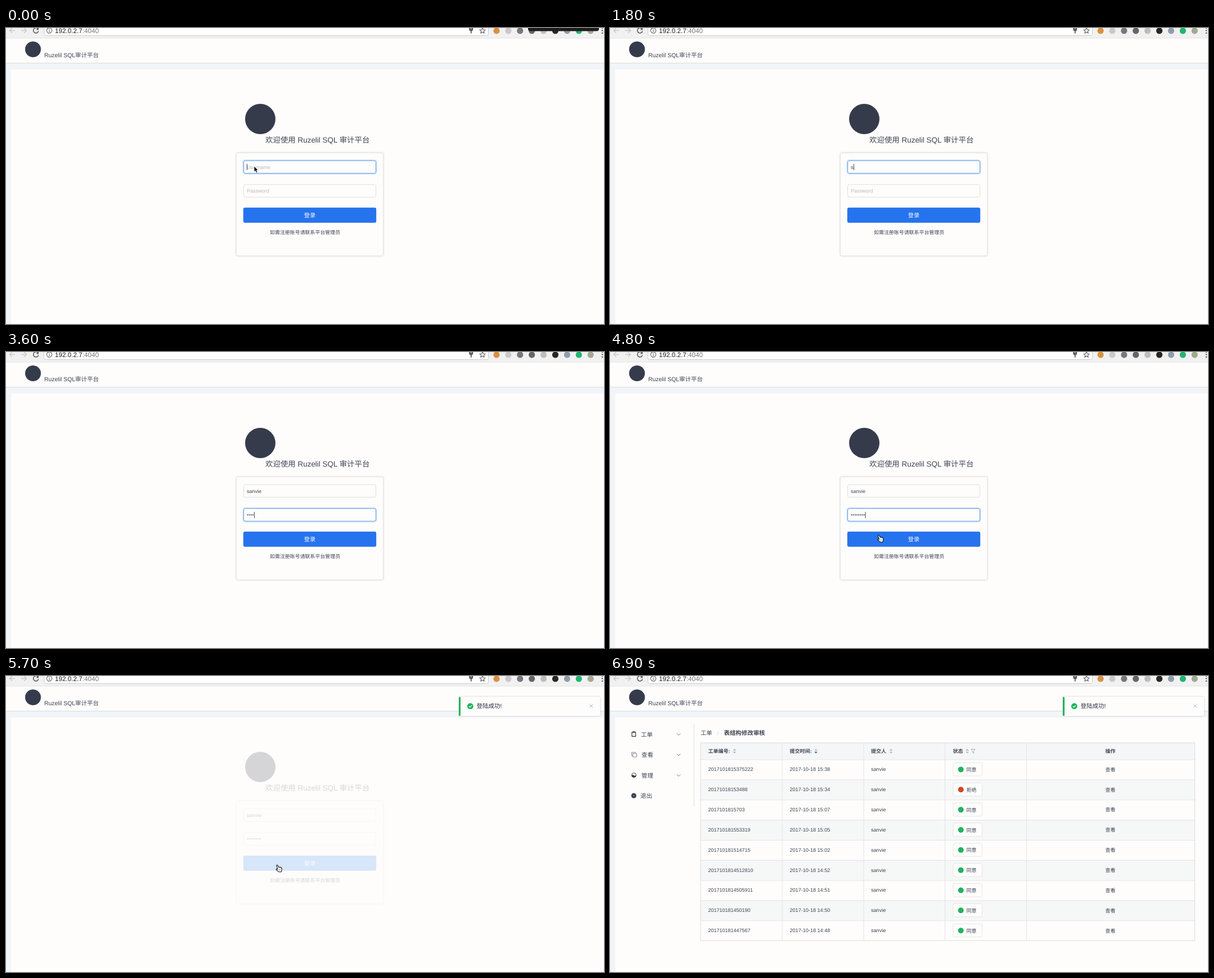
An HTML page that plays this animation: 1063x527 px, repeating every 7.2 s.

```html
<!DOCTYPE html>
<html lang="zh">
<head>
<meta charset="utf-8">
<title>SQL 审计平台</title>
<style>
  html, body { margin: 0; width: 100%; height: 100%; overflow: hidden; background: #fefdfc; }
  svg { display: block; width: 1063px; height: 527px; font-family: "Liberation Sans", "Noto Sans CJK SC", "Noto Sans CJK", sans-serif; }
  text { white-space: pre; text-rendering: geometricPrecision; }
  .card { filter: drop-shadow(0 .8px 1.8px rgba(0, 0, 0, .2)); }
</style>
</head>
<body>
<svg id="stage" viewBox="0 0 1063 527"></svg>
<script>
const INK = '#3e4454', DARK = '#363b4c', GREEN = '#1fb35d', BRAND = 'Ruzelil', USER = 'sanvie';
const PAPER = '#fefdfc', LINE = '#e2e4e8', HINT = '#b6bac3';

const rect = (x, y, w, h, fill, extra = '') =>
  `<rect x="${x}" y="${y}" width="${w}" height="${h}" fill="${fill}" ${extra}/>`;
const circle = (x, y, r, fill, extra = '') => `<circle cx="${x}" cy="${y}" r="${r}" fill="${fill}" ${extra}/>`;
const path = (d, stroke, width = 1, fill = 'none') =>
  `<path d="${d}" fill="${fill}" stroke="${stroke}" stroke-width="${width}" stroke-linejoin="round"/>`;
const text = (x, y, size, str, fill = INK, extra = '') =>
  `<text x="${x}" y="${y}" font-size="${size}" fill="${fill}" ${extra}>${str}</text>`;
const group = (id, body) => `<g id="${id}">${body}</g>`;
const BOLD = 'font-weight="700"', MIDDLE = 'text-anchor="middle"';

function toolbar() {
  const badges = ['#d9913f', '#c9c9c9', '#77777b', '#656565', '#bdbdbd', '#292621', '#8f9dab', '#20b573', '#a0ab8d'];
  return rect(0, 0, 1063, 18, '#f2f1f2') + rect(0, 17.5, 1063, 1, '#e4e4e5') +
    rect(67.5, -10, 790, 23.5, '#fff', 'rx="3" stroke="#cbcbcc"') +
    path('M16 4.5H6.5M11 0L6.5 4.5L11 9', '#c9c9ca', 1.4) +
    path('M27 4.5H36.5M32 0L36.5 4.5L32 9', '#c9c9ca', 1.4) +
    path('M56.6 1.2A4.6 4.6 0 1 0 57.7 5.5', '#606062', 1.6) +
    path('M58 -1V3.5H53.5Z', 'none', 0, '#606062') +
    circle(77, 4.5, 4.6, 'none', 'stroke="#616163" stroke-width="1.2"') + rect(76.4, 3.8, 1.2, 3.4, '#616163') +
    rect(76.4, 1.7, 1.2, 1.2, '#616163') +
    text(87, 8.5, 11.7, '192.0.2.7<tspan fill="#757577">:4040</tspan>', '#1c1c1c') +
    circle(826.7, 2, 3.6, '#5a5a5c') + circle(826.7, .6, 1, '#fff') + rect(825.8, 4, 1.9, 5.6, '#5a5a5c') +
    path('M847 -.5L848.5 3L852 3.3L849.3 5.7L850.2 9.3L847 7.3L843.8 9.3L844.7 5.7L842 3.3L845.5 3Z', '#5a5a5c', 1.1) +
    badges.map((color, i) => circle(872 + 20.9 * i, 5, 5.6, color)).join('') +
    [0, 4.5, 9].map(y => circle(1060, y, 1.3, '#5c5c5e')).join('') +
    group('redaction', rect(928, -8, 126, 13.5, '#1e1b1d', 'rx="4"'));
}

function header() {
  return rect(0, 18, 1063, 44, PAPER) + rect(0, 62, 1063, 465, '#f2f5f8') + rect(0, 62, 1063, 1, '#d9dce0') +
    rect(9, 74, 1053, 453, PAPER) + circle(48, 38, 14, DARK) +
    text(68, 52, 10.45, BRAND + ' SQL审计平台');
}

const field = (id, y) =>
  rect(421.5, y - .5, 237, 24.5, 'none', `id="${id}Ring" rx="4" stroke="#2d8cf0" stroke-opacity=".2" stroke-width="2.5"`) +
  rect(422.5, y + .5, 235, 22.5, PAPER, `id="${id}Box" rx="3"`);

function login() {
  const dots = Array.from({ length: 8 }, (_, i) => circle(429.6 + 3.15 * i, 290, 1.1, INK, 'class="dot"')).join('');
  return circle(452, 162, 27, DARK) +
    text(461, 203.5, 13.45, `欢迎使用 ${BRAND} SQL 审计平台`) +
    rect(409.5, 222.5, 261, 183, PAPER, 'rx="3" class="card" stroke="#e3e4e6" stroke-width=".7"') +
    field('user', 235.7) + field('pass', 278.2) +
    text(428, 250.5, 9, '', INK, 'id="userText"') + text(428, 293.2, 9, 'Password', HINT, 'id="passHint"') + dots +
    rect(428, 242, 1, 11, '#444', 'id="caret"') +
    rect(421.8, 319.8, 236.4, 27, '#2673ee', 'id="submit" rx="3"') +
    text(540, 336.7, 10.2, '登录', '#fff', MIDDLE) +
    text(469, 366.5, 8.95, '如需注册账号请联系平台管理员');
}

function menu() {
  const entry = (x, y, label, arrow) => text(x, y + 4, 10.4, label) +
    (arrow ? path(`M118.8 ${y - 1.2}L122 ${y + 2}L125.2 ${y - 1.2}`, '#70747f') : '');
  return entry(55, 103.5, '工单', true) + entry(56, 140, '查看', true) +
    entry(56, 176.5, '管理', true) + entry(54, 213, '退出', false) +
    path('M39 100H45.5V107.5H39Z', INK, 1.3) + rect(40.5, 98.5, 3.5, 2.5, INK) +
    path('M40.5 138H47.5V144H40.5ZM40 142H38.5V136H45.5V137.5', '#858994', 1) +
    circle(42.5, 176.5, 4, PAPER, `stroke="${INK}"`) +
    path('M38.5 177Q40.5 175 42.5 177T46.5 176A4 4 0 0 1 38.5 177Z', 'none', 0, DARK) +
    circle(42.3, 213, 4.5, DARK) + path('M40.8 211.5L43.8 214.5M43.8 211.5L40.8 214.5', '#9a9da6', .9) +
    rect(148.7, 85, 1, 147, '#dddee1');
}

const sorter = (x, active) =>
  path(`M${x - 3} 132.7L${x} 129.4L${x + 3} 132.7Z`, 'none', 0, '#b8bbc3') +
  path(`M${x - 3} 134.8L${x} 138.1L${x + 3} 134.8Z`, 'none', 0, active ? '#2d7eea' : '#b8bbc3');

function table() {
  const top = 148.5, step = 35.85;
  const rows = ['2017101815375222 15:38', '20171018153488 15:34', '2017101815703 15:07', '201710181553319 15:05',
    '201710181514715 15:02', '2017101814512810 14:52', '2017101814505911 14:51', '201710181450190 14:50', '201710181447567 14:48'];
  const titles = [[174.5, '工单编号:'], [319.5, '提交时间:'], [464, '提交人'], [609.5, '状态'], [880.5, '操作']];
  const body = rows.map((row, i) => {
    const [id, time] = row.split(' '), y = top + step * i, mid = y + 17.9, base = mid + 2.9, refused = i === 1;
    return rect(161, y, 879, step, i % 2 ? '#f6f7f7' : PAPER) + rect(161, y, 879, 1, LINE) +
      text(174.5, base, 9, id) + text(319.5, base, 9.1, '2017-10-18 ' + time) + text(464, base, 9.1, USER) +
      rect(610, mid - 12, 51.5, 23.5, PAPER, 'rx="2" stroke="#e4e6e9"') +
      circle(623.7, mid, 5, refused ? '#d4451d' : GREEN) +
      text(633.5, mid + 3.6, 9, refused ? '拒绝' : '同意') + text(880.5, mid + 3.3, 9, '查看');
  }).join('');
  return text(161, 104.8, 10.3, '工单') + text(190.5, 104.8, 10, '/', '#d5d7db') +
    text(202.5, 104.8, 10.45, '表结构修改审核', INK, BOLD) +
    rect(161, 119, 879, 29.5, '#f5f6f8') +
    titles.map(([x, label]) => text(x, 137.2, 9, label, INK, BOLD)).join('') + body +
    [306, 451, 595.5, 740.5].map(x => rect(x - .5, 119, 1, 352, LINE)).join('') +
    rect(161, 119, 878.5, 352, 'none', 'stroke="#d9dbe0"') +
    sorter(221.3) + sorter(366, true) + sorter(499.5) + sorter(635) +
    path('M641.8 130.5H649.2L646.5 133.8V137.5L644.5 136.3V133.8Z', '#a2a6b0', .9);
}

function notice() {
  return rect(805, 37, 251, 34, PAPER, 'rx="3" class="card"') + rect(805, 37, 3, 34, GREEN, 'rx="1.5"') +
    circle(825.3, 53.7, 5.4, GREEN) + path('M822.8 53.8L824.7 55.6L827.9 52.1', '#fff', 1.2) +
    text(836.5, 57.3, 10.5, '登陆成功!', '#2b3144', 'font-weight="500"') +
    path('M1037.5 50.7L1043 56.2M1043 50.7L1037.5 56.2', '#a5a8b0', 1);
}

const arrow = path('M0 0V10.3L2.4 8.2L4 12L6 11.2L4.4 7.5H7.6Z', '#fff', .8, '#111');
const hand = path('M1.3 1.6Q2.3 .2 3.4 1.4L5.2 4.8Q6.2 4 7.1 4.9Q8.3 4.3 9 5.4Q10.3 5.2 10.5 6.6L10.7 9.6L9.9 13H5.2L1 9.2Q.2 7.9 1.6 7.6L3.6 8.6Z', '#111', 1.1, '#fff') +
  path('M6 8.5L6.3 10.8M7.6 8.3L7.9 10.6', '#444', .6);

const stage = document.getElementById('stage');
stage.innerHTML = header() + group('login', login()) + group('home', menu() + table()) +
  group('notice', notice()) + toolbar() + group('arrow', arrow) + group('hand', hand);

const $ = id => document.getElementById(id);
const show = (el, on) => el.setAttribute('visibility', on ? 'visible' : 'hidden');
const BEAT = 300, LOOP = 7200;

// Every row holds from its time until the next row for the same part.
const track = {
  typed: [[0, 0], [1800, 1], [2100, 4], [2400, 6]],
  dots: [[0, 0], [3300, 2], [3600, 4], [3900, 6], [4200, 8]],
  focus: [[0, 'user'], [2700, 'both'], [3000, 'pass'], [5100, '']],
  caret: [[0, 1], [600, 0], [1200, 1], [5100, 0]],
  arrow: [[0, [441, 246]], [1800, null], [6000, [899.5, 479.5]], [6300, null]],
  hand: [[0, null], [4500, [475, 325.2]], [5100, [479.5, 335.7]], [6000, null]],
  submit: [[0, '#2673ee'], [5400, '#4290f1']],
  login: [[0, 1], [5400, .54], [5700, .2], [6000, 0]],
  notice: [[0, [199, 0]], [5400, [199, .27]], [5700, [0, 1]]]
};
const at = (name, t) => track[name].filter(([start]) => start <= t).pop()[1];

function styleField(id, color, ring) {
  $(id + 'Box').setAttribute('stroke', color);
  show($(id + 'Ring'), ring);
}

function pointer(id, pos) {
  show($(id), pos);
  if (pos) $(id).setAttribute('transform', `translate(${pos})`);
}

function render(t) {
  const typed = at('typed', t), dots = at('dots', t), focus = at('focus', t), both = focus === 'both';
  const onPass = both || focus === 'pass';
  $('userText').textContent = typed ? USER.slice(0, typed) : 'Username';
  $('userText').setAttribute('fill', typed ? INK : HINT);
  show($('passHint'), !dots);
  document.querySelectorAll('.dot').forEach((dot, i) => show(dot, i < dots));

  styleField('user', both ? '#70b0f0' : focus === 'user' ? '#5799ec' : '#dddee1', focus === 'user');
  styleField('pass', both ? '#9dc8ed' : focus === 'pass' ? '#5799ec' : '#dddee1', focus === 'pass');

  const textEnd = onPass ? dots * 3.15 : typed ? $('userText').getComputedTextLength() : 0;
  $('caret').setAttribute('x', 428 + textEnd + (textEnd ? .4 : 0));
  $('caret').setAttribute('y', onPass ? 284.7 : 242);
  show($('caret'), at('caret', t));

  const fade = at('login', t), [shift, alpha] = at('notice', t);
  $('login').setAttribute('opacity', fade);
  $('submit').setAttribute('fill', at('submit', t));
  $('home').setAttribute('opacity', fade ? 0 : 1);
  $('notice').setAttribute('opacity', alpha);
  $('notice').setAttribute('transform', `translate(${shift} 0)`);
  $('redaction').setAttribute('opacity', t < BEAT ? 1 : 0);
  pointer('arrow', at('arrow', t));
  pointer('hand', at('hand', t));
}

const began = performance.now();
let shown = -1;
function tick() {
  const beat = Math.floor(((performance.now() - began) % LOOP) / BEAT) * BEAT;
  if (beat !== shown) render(shown = beat);
  requestAnimationFrame(tick);
}
tick();
</script>
</body>
</html>
```
